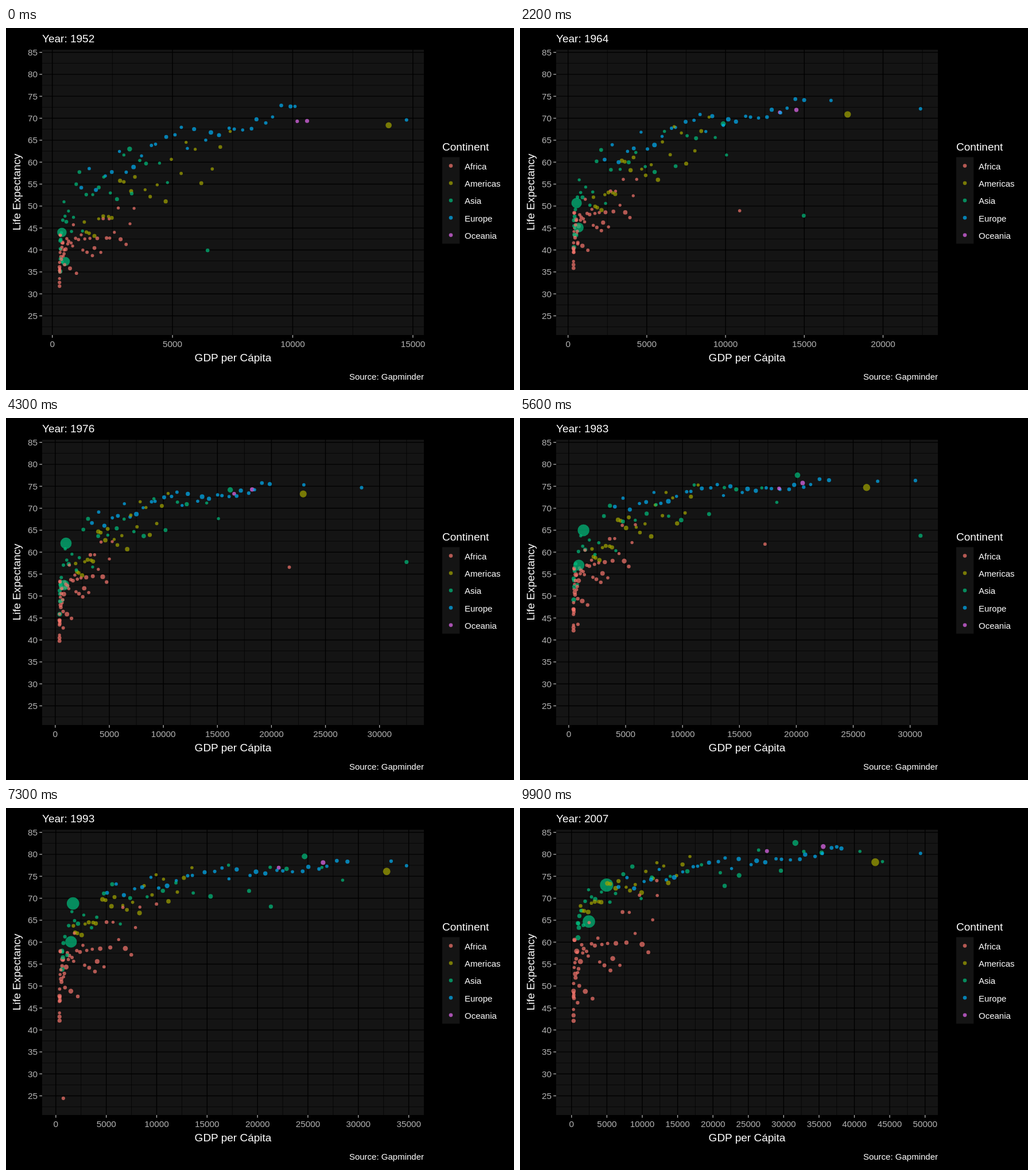
An HTML page for the animation above (10 s loop, 885x632 px).

```html
<!DOCTYPE html>
<html lang="en">
<head>
<meta charset="utf-8">
<title>Life expectancy and GDP</title>
<style>
  html, body { margin: 0; width: 100%; height: 100%; overflow: hidden; background: #000; }
  svg { display: block; font: 15px "Liberation Sans", Arial, sans-serif; fill: #fff; }
  .big { font-size: 19px; }
  .tick { font-size: 15.3px; fill: #b3b3b3; }
  .panel { fill: #141414; }
  .major { stroke: #000; stroke-width: 1.4; }
  .minor { stroke: #000; stroke-width: .7; }
  .mark { stroke: #b3b3b3; stroke-width: 1.3; }
  .dot { opacity: .7; }
</style>
</head>
<body>
<svg width="885" height="632" viewBox="0 0 885 632">
  <rect class="panel" x="63" y="38" width="665" height="498"/>
  <g id="rows"></g>
  <g id="columns"></g>
  <g id="dots"></g>
  <text class="big" id="year" x="63" y="24.5">Year: 1952</text>
  <text class="big" x="395.5" y="582" text-anchor="middle">GDP per Cápita</text>
  <text class="big" transform="translate(25 286.5) rotate(-90)" text-anchor="middle">Life Expectancy</text>
  <text x="728" y="613.5" text-anchor="end">Source: Gapminder</text>
  <text class="big" x="760" y="214">Continent</text>
  <rect class="panel" x="760" y="225.5" width="30.3" height="151"/>
  <g id="legend"></g>
</svg>
<script>
const FIRST = 1952, LAST = 2007, FRAMES = 100, STEP = 100;
const PANEL = { left: 63, right: 728, top: 38, bottom: 536 };

// Trend rows: year, lowest and highest GDP, lowest and highest life, spread of life.
// skew bends the GDP ranking; young is the share of the final population at the start.
const CONTINENTS = {
  Africa: { color: '#F8766D', count: 50, skew: 3, young: .27, trend: [
    [1952, 300, 3500, 35, 44, 7], [1983, 420, 6000, 45, 60, 8], [2007, 278, 12500, 47, 62, 11]] },
  Americas: { color: '#A3A500', count: 24, skew: 1.4, young: .45, trend: [
    [1952, 1300, 7500, 40, 64, 8], [1983, 2000, 11500, 56, 73, 6], [2007, 1200, 17000, 65, 78, 4]] },
  Asia: { color: '#00BF7D', count: 29, skew: 2.8, young: .4, trend: [
    [1952, 330, 5000, 35, 60, 9], [1983, 430, 19000, 48, 75, 7], [2007, 900, 46000, 60, 81, 5]] },
  Europe: { color: '#00B0F6', count: 28, skew: 1, young: .74, trend: [
    [1952, 1000, 10000, 53, 72, 4], [1983, 3600, 23000, 70, 76, 2], [2007, 5900, 38500, 72, 81, 2]] },
  Oceania: { color: '#E76BF3', count: 2, skew: 1, young: .43, trend: [
    [1952, 9900, 10700, 69.2, 69.4, 0], [1983, 17000, 21000, 73, 76, 0], [2007, 22000, 37600, 79.5, 82, 0]] }
};

// Countries that leave the trend: continent, population in millions, key points of year, GDP and life
const LEADERS = [
  ['Asia', 1318, [1952, 400, 44], [1957, 576, 50.5], [1962, 488, 44.5], [1967, 613, 58.4], [1993, 1720, 69], [2007, 4959, 73]],
  ['Asia', 1110, [1952, 547, 37.4], [1983, 880, 57], [2007, 2452, 64.7]],
  ['Asia', 127, [1952, 3217, 63], [1983, 20050, 77.5], [2007, 31656, 82.6]],
  ['Asia', 28, [1952, 6460, 39.9], [1962, 11626, 45.9], [1977, 34168, 58.7], [1982, 33693, 63], [1987, 21198, 66.3], [2007, 21655, 72.8]],
  ['Americas', 301, [1952, 13990, 68.4], [1959, 15430, 69.8], [1983, 26100, 74.7], [2007, 42952, 78.2]],
  ['Europe', 8, [1952, 14734, 69.6], [1957, 17909, 70.6], [1972, 27195, 73.8], [2007, 37506, 81.7]],
  ['Europe', 5, [1952, 10095, 72.7], [1982, 26299, 76], [1992, 33966, 77.3], [1997, 41283, 78.3], [2007, 49357, 80.2]],
  ['Africa', 6, [1952, 2388, 42.7], [1962, 6757, 47.8], [1969, 19800, 51.4], [1977, 21951, 57.4], [1993, 9640, 69], [2007, 12057, 74]],
  ['Africa', 9, [1952, 493, 40], [1987, 848, 44], [1992, 737, 23.6], [2007, 863, 46.2]]
];

const $ = id => document.getElementById(id);
const lerp = (a, b, u) => a + (b - a) * u;
const yOf = life => 42.5 + (85 - life) * 7.667;

let seed = 11;
const random = () => (seed = seed * 16807 % 2147483647) / 2147483647;

function draw(parent, tag, attrs, text) {
  const el = document.createElementNS('http://www.w3.org/2000/svg', tag);
  for (const k in attrs) el.setAttribute(k, attrs[k]);
  if (text !== undefined) el.textContent = text;
  return parent.appendChild(el);
}

// Values of a keyed path at a year, without the year itself
function along(keys, year) {
  let i = 1;
  while (i < keys.length - 1 && year > keys[i][0]) i++;
  const a = keys[i - 1], b = keys[i];
  const u = (year - a[0]) / (b[0] - a[0]);
  return a.slice(1).map((v, k) => lerp(v, b[k + 1], u));
}

// Richer ranks live longer, with diminishing gains
function onTrend({ trend, skew }, rank, luck) {
  return year => {
    const [poor, rich, short, long, spread] = along(trend, year);
    return [lerp(poor, rich, rank ** skew), lerp(short, long, rank ** .7) + luck * spread];
  };
}

const countries = LEADERS.map(([name, pop, ...keys]) => (
  { continent: CONTINENTS[name], pop, at: year => along(keys, year) }
));
for (const continent of Object.values(CONTINENTS)) {
  for (let i = 0; i < continent.count; i++) {
    const rank = (i + .2 + .6 * random()) / continent.count;
    const luck = random() + random() - 1;
    countries.push({ continent, pop: 1.5 * 50 ** random(), at: onTrend(continent, rank, luck) });
  }
}
for (const c of countries) c.layer = random();
countries.sort((a, b) => a.layer - b.layer);

// Minor lines first, so that major ones lie on top
for (const major of [false, true]) {
  for (let life = major ? 25 : 22.5; life <= 85; life += 5) {
    const y = yOf(life);
    draw($('rows'), 'path', { class: major ? 'major' : 'minor', d: `M${PANEL.left} ${y}H${PANEL.right}` });
    if (!major) continue;
    draw($('rows'), 'path', { class: 'mark', d: `M58.2 ${y}H63` });
    draw($('rows'), 'text', { class: 'tick', x: 55, y: y + 5.5, 'text-anchor': 'end' }, life);
  }
}

const columns = [];
for (let gdp = 0; gdp <= 52500; gdp += 2500) {
  const major = gdp % 5000 === 0, el = draw($('columns'), 'g', {});
  draw(el, 'path', { class: major ? 'major' : 'minor', d: `M0 ${PANEL.top}V${PANEL.bottom}` });
  if (major) {
    draw(el, 'path', { class: 'mark', d: 'M0 536V540.8' });
    draw(el, 'text', { class: 'tick', y: 557, 'text-anchor': 'middle' }, gdp);
  }
  columns.push({ gdp, el });
}

const dot = (parent, color, attrs) => draw(parent, 'circle', { class: 'dot', fill: color, ...attrs });
Object.entries(CONTINENTS).forEach(([name, { color }], i) => {
  const y = 240.6 + i * 30.25;
  dot($('legend'), color, { cx: 775, cy: y, r: 3.3 });
  draw($('legend'), 'text', { x: 799, y: y + 6.2 }, name);
});
for (const c of countries) c.el = dot($('dots'), c.continent.color, {});

function show(year) {
  const places = countries.map(c => c.at(year));
  const incomes = places.map(([gdp]) => gdp);
  // The view follows the poorest and the richest country
  const low = Math.min(...incomes), high = Math.max(...incomes);
  const margin = (PANEL.right - PANEL.left) / 22;
  const xOf = gdp => lerp(PANEL.left + margin, PANEL.right - margin, (gdp - low) / (high - low));
  $('year').textContent = 'Year: ' + Math.round(year);

  for (const { gdp, el } of columns) {
    const x = xOf(gdp);
    el.setAttribute('transform', `translate(${x.toFixed(2)} 0)`);
    el.style.display = x > PANEL.right ? 'none' : '';
  }
  countries.forEach(({ el, pop, continent }, i) => {
    const [gdp, life] = places[i];
    const people = pop * lerp(continent.young, 1, (year - FIRST) / (LAST - FIRST));
    el.setAttribute('cx', xOf(gdp).toFixed(2));
    el.setAttribute('cy', yOf(life).toFixed(2));
    el.setAttribute('r', (2.4 + 9.2 * Math.sqrt(people / 1318)).toFixed(2));
  });
}

const start = performance.now();
let shown = -1;
function tick() {
  const frame = Math.floor((performance.now() - start) / STEP) % FRAMES;
  if (frame !== shown) show(lerp(FIRST, LAST, frame / (FRAMES - 1)));
  shown = frame;
  requestAnimationFrame(tick);
}
tick();
</script>
</body>
</html>
```
